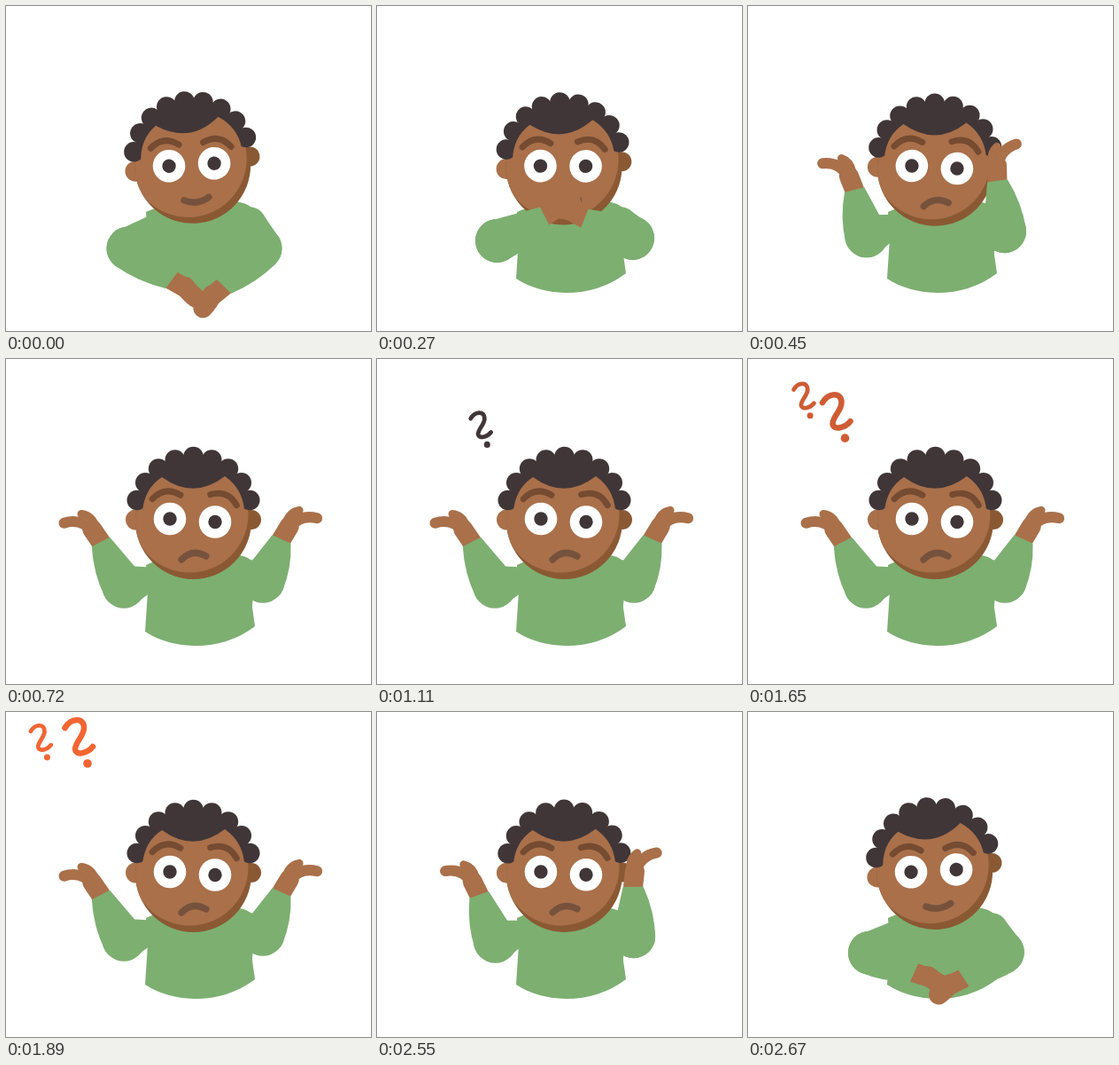
These frames come from a looping animation (412x366 px, 2700 ms). An HTML page with a canvas:

```html
<!DOCTYPE html>
<html>
<head>
<meta charset="utf-8">
<style>
  html, body { margin: 0; width: 100%; height: 100%; overflow: hidden; background: #fff; }
  canvas { display: block; }
</style>
</head>
<body>
<canvas id="stage" width="412" height="366"></canvas>
<script>
const ctx = document.getElementById('stage').getContext('2d');
const LOOP = 2700, RAD = Math.PI / 180;
const SKIN = '#a9704a', SHADE = '#8a5933', HAIR = '#403638', GREEN = '#7daf71';
const BROW = '#754b31', LIPS = '#76523d';

const lerp = (a, b, k) => a + (b - a) * k;
const mix = (p, q, k) => p.map((v, i) => lerp(v, q[i], k));
const clamp = v => Math.max(0, Math.min(1, v));
const bezier = (p, c, q, k) => mix(mix(p, c, k), mix(c, q, k), k);

const ARMS = [
  { side: 1, shoulder: [168, 246], cap: 12, elbow: [[138, 273], [133, 256]],
    fold: [187, 309], chest: [190, 237], via: [117, 201], open: [107, 206] },
  { side: -1, shoulder: [274, 246], cap: 20, elbow: [[287, 273], [290, 250]],
    fold: [246, 316], chest: [234, 240], via: [262, 180], open: [311, 203] }
];
const ELBOW = 24.5, CUFF = 11.5;

function disc(x, y, r, color) {
  ctx.fillStyle = color;
  ctx.beginPath();
  ctx.arc(x, y, r, 0, 7);
  ctx.fill();
}

function fill(path, color) {
  ctx.fillStyle = color;
  ctx.fill(new Path2D(path));
}

function stroke(path, width, color) {
  ctx.lineWidth = width;
  ctx.lineCap = ctx.lineJoin = 'round';
  ctx.strokeStyle = color;
  ctx.stroke(new Path2D(path));
}

function at([x, y, degrees = 0], paint) {
  ctx.save();
  ctx.translate(x, y);
  ctx.rotate(degrees * RAD);
  paint();
  ctx.restore();
}

// Limb from a thick end to a thin end; each side may bulge.
function limb([ax, ay], R, [bx, by], r, left = 0, right = 0) {
  at([ax, ay, Math.atan2(by - ay, bx - ax) / RAD], () => {
    const n = Math.hypot(bx - ax, by - ay), m = (R + r) / 2;
    fill(`M0 ${-R}Q${n / 2} ${-m - left} ${n} ${-r}V${r}Q${n / 2} ${m + right} 0 ${R}Z`, GREEN);
  });
  disc(ax, ay, R, GREEN);
}

// 0: arms crossed, 1: hands at the chest, 2: arms spread
function liftAt(t) {
  if (t < 270) return t / 270;
  if (t < 2520) return 2 - (1 - clamp((t - 270) / 420)) ** 2;
  return 2 - 2 * clamp((t - 2520) / 165) ** 1.28;
}

const elbowAt = (arm, lift) => mix(...arm.elbow, lift / 2);
const wristAt = (arm, lift) => lift < 1
  ? mix(arm.fold, arm.chest, lift)
  : bezier(arm.chest, arm.via, arm.open, lift - 1);

function upperArm(arm, lift) {
  limb(elbowAt(arm, lift), ELBOW, arm.shoulder, arm.cap);
  disc(...arm.shoulder, arm.cap, GREEN);
}

function forearm(arm, lift) {
  const e = elbowAt(arm, lift), w = wristAt(arm, lift), { side } = arm;
  const spread = clamp((lift - 1) * 1.5);

  at([...w, Math.atan2(w[1] - e[1], w[0] - e[0]) / RAD], () => {
    ctx.scale(1, -side);
    stroke('M0 0L17 2', 22, SKIN);
    const [cx, cy, x, y] = mix([26, 0, 34, 0], [35, 8, 38, 27], spread);
    stroke(`M16 3Q${cx} ${cy} ${x} ${y}`, lerp(22, 12, spread), SKIN);
    stroke(`M20 -3Q32 -4 ${lerp(30, 38, spread)} 5`, 9, SKIN);
  });

  const outer = 6 * spread, inner = 6 - outer;
  limb(e, ELBOW, w, CUFF, side > 0 ? outer : inner, side > 0 ? inner : outer);
}

function torso() {
  fill('M158 232C170 226 185 224 212 222C240 218 265 218 276 226C290 238 278 262 278 280' +
    'L281 301Q252 323 213 323Q180 322 157 307L160 262Z', GREEN);
}

function hair() {
  ctx.fillStyle = HAIR;
  ctx.beginPath();
  ctx.ellipse(211.5, 181, 67, 71, 0, -162 * RAD, -18 * RAD);
  ctx.fill();
  for (let a = -72; a <= 72; a += 18) {
    disc(211.5 + 67 * Math.sin(a * RAD), 181 - 71 * Math.cos(a * RAD), 11.3, HAIR);
  }
  fill('M154 172Q156 146 176 133Q212 159 247 132Q267 146 269 170Z', SKIN);
}

function head(k) {
  const brow = () => stroke('M-16 4Q0 -9 16 4', 7, BROW);
  at(mix([211, 178.3, -7.3], [212, 181.5, 0], k), () => {
    ctx.translate(-212, -181.5);
    disc(146.5, 181, 11.5, SKIN);
    disc(277, 181, 11, SHADE);
    disc(211.5, 182.5, 65.5, SHADE);
    ctx.save();
    ctx.clip();
    disc(207.5, 174.5, 66, SKIN);
    ctx.restore();
    hair();

    at(mix([183, 153.5, 0], [180.5, 151.5, -8], k), brow);
    at(mix([243, 159, 16], [247, 155, 22], k), brow);
    for (const [x, y] of [[185, 180], [236, 183.5]]) {
      disc(x, y, 18.3, '#fff');
      disc(x, y, 7.7, HAIR);
    }
    at(mix([211, 220.5, 0], [212, 224, -8], k), () =>
      stroke(`M-14 0Q0 ${lerp(8, -11, k)} 14 0`, 7.5, LIPS));
  });
}

// A question mark that sways up from the hair to its resting place.
function mark(t, { start, span, from, to, sway, lag, size }) {
  const u = clamp((t - start) / span);
  if (!u || t > 2100) return;
  const swing = Math.sin(Math.PI * u) + .75 * Math.sin(2 * Math.PI * u);
  const x = lerp(from[0], to[0], u) - sway * swing;
  const y = lerp(from[1], to[1], u ** lag);
  const color = `rgb(${mix([64, 54, 56], [242, 101, 51], clamp((t - 1250) / 500))})`;
  ctx.globalAlpha = clamp((2100 - t) / 170);
  at([x, y], () => {
    const scale = size * clamp(u * 6);
    ctx.scale(scale, scale);
    stroke('M-16 -16C-9 -28 6 -28 5.5 -16C5.5 -7 -4.5 0 -4.5 8C-3 16 10 12 15.5 5', 6.5, color);
    disc(9.5, 24, 4.8, color);
  });
  ctx.globalAlpha = 1;
}

const MARKS = [
  { start: 960, span: 900, from: [140, 88], to: [39.5, 33.5], sway: 5, lag: 1, size: .73 },
  { start: 1170, span: 690, from: [150, 105], to: [82.5, 34], sway: 28, lag: 1.6, size: 1 }
];

const begin = performance.now();

function draw() {
  const t = (performance.now() - begin) % LOOP;
  const lift = liftAt(t), k = lift / 2;
  ctx.fillStyle = '#fff';
  ctx.fillRect(0, 0, 412, 366);
  MARKS.forEach(m => mark(t, m));
  torso();
  ARMS.forEach(arm => upperArm(arm, lift));
  head(k * k * (3 - 2 * k));
  ARMS.forEach(arm => forearm(arm, lift));
  requestAnimationFrame(draw);
}
draw();
</script>
</body>
</html>
```
